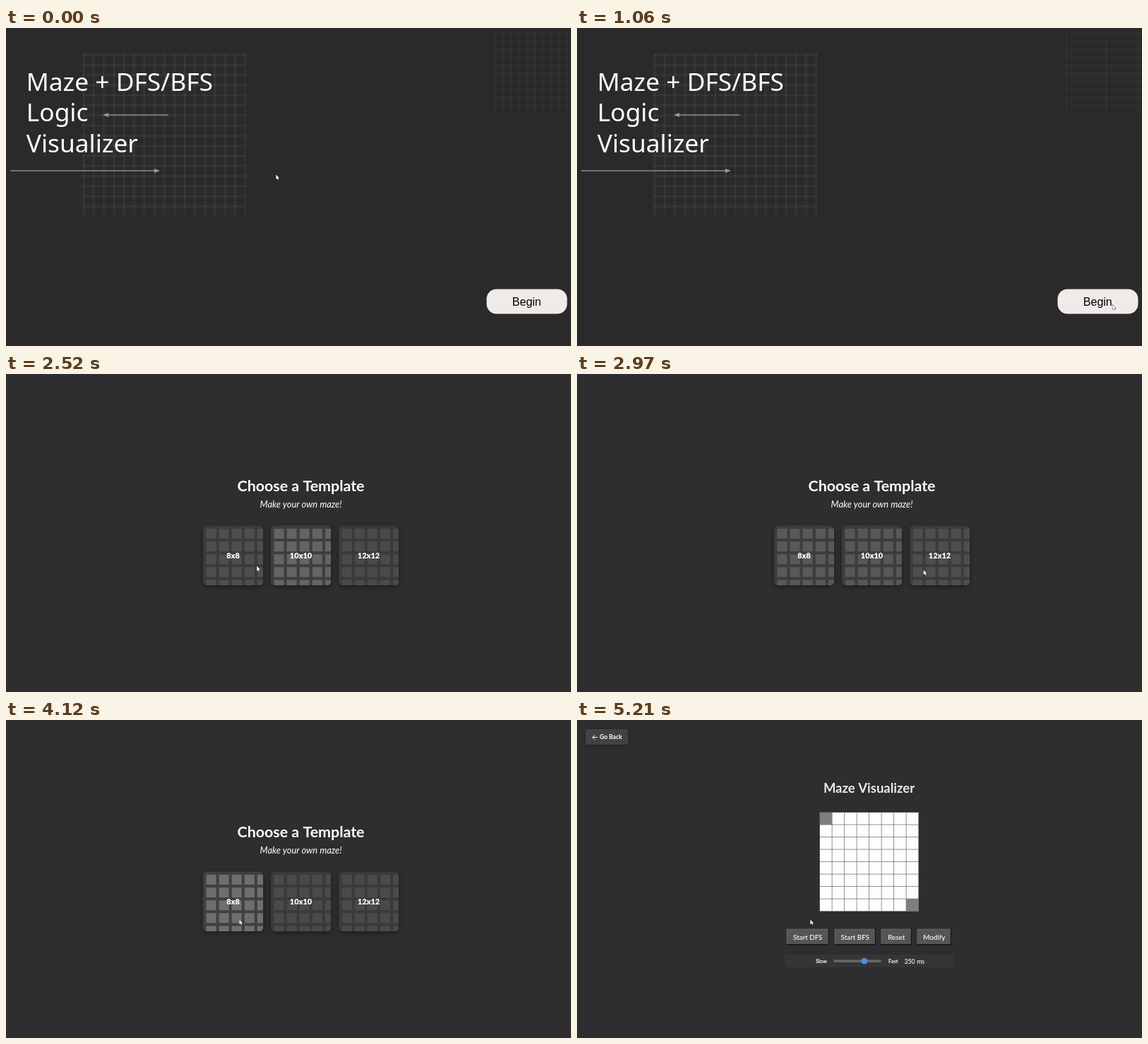
Write an HTML page with a canvas that moves like this. It is 800x450 px and loops after 5.24 s.

```html
<!DOCTYPE html>
<html lang="en">
<head>
<meta charset="utf-8">
<title>Maze visualizer</title>
<style>
  html, body { margin: 0; width: 100%; height: 100%; overflow: hidden; background: #2a2a2a; }
  canvas { display: block; width: 800px; height: 450px; }
</style>
</head>
<body>
<canvas width="800" height="450"></canvas>
<script>
const ctx = document.querySelector('canvas').getContext('2d');
const LOOP = 5240, CHOOSER_AT = 1090, RELEASE_AT = 4060, MAZE_AT = 4420;
const FADE = 300, HAND_DELAY = 40;
const CARD = { y: 214.5, w: 85, h: 84.5 };
const cardX = i => 279 + 96 * i;

// Places where the pointer pauses or turns
const STOPS = [
  { t: 30, x: 382, y: 207 },
  { t: 420, x: 758, y: 391 },
  { t: 1390, x: 758, y: 391 },
  { t: 1640, x: 567, y: 384 },
  { t: 1970, x: 522, y: 291 },
  { t: 2700, x: 325, y: 268 },
  { t: 3040, x: 510, y: 278 },
  { t: 3640, x: 330, y: 282 }
];

const smooth = p => p * p * (3 - 2 * p);
const clamp = (v, low, high) => Math.max(low, Math.min(high, v));

function pointerAt(t) {
  const next = clamp(STOPS.findIndex(s => s.t > t), 1, STOPS.length - 1);
  const i = t >= STOPS.at(-1).t ? STOPS.length - 1 : next;
  const a = STOPS[i - 1], b = STOPS[i];
  const p = smooth(clamp((t - a.t) / (b.t - a.t), 0, 1));
  return { x: a.x + (b.x - a.x) * p, y: a.y + (b.y - a.y) * p };
}

function hovers(i, t) {
  const { x, y } = pointerAt(t);
  return t > CHOOSER_AT && x > cardX(i) && x < cardX(i) + CARD.w && y > CARD.y && y < CARD.y + CARD.h;
}

// Share of the last FADE ms that the pointer spent on the card
function glow(i, t) {
  const samples = 50;
  let hits = 0;
  for (let n = 0; n < samples; n++) hits += hovers(i, t - n / samples * FADE);
  return hits / samples;
}

function rect(x, y, w, h, color) {
  ctx.fillStyle = color;
  ctx.fillRect(x, y, w, h);
}

function rounded(x, y, w, h, r, color) {
  ctx.fillStyle = color;
  ctx.beginPath();
  ctx.roundRect(x, y, w, h, r);
  ctx.fill();
}

function text(str, x, y, font, color = '#fff', align = 'center') {
  ctx.font = font;
  ctx.fillStyle = color;
  ctx.textAlign = align;
  ctx.fillText(str, x, y);
}

const lato = (size, style = 'bold') => `${style} ${size}px Lato, "Open Sans", sans-serif`;

function shadow(color, blur, dy) {
  ctx.shadowColor = color;
  ctx.shadowBlur = blur;
  ctx.shadowOffsetY = dy;
}

function grid(x, y, w, h, step, line, color) {
  for (let gx = x; gx < x + w; gx += step) rect(gx, y, Math.min(line, x + w - gx), h, color);
  for (let gy = y; gy < y + h; gy += step) rect(x, gy, w, Math.min(line, y + h - gy), color);
}

function arrow(from, to, y) {
  const back = to - Math.sign(to - from) * 8;
  rect(Math.min(from, back), y - .75, Math.abs(back - from), 1.5, '#8c8c8c');
  ctx.fillStyle = '#9a9a9a';
  ctx.beginPath();
  ctx.moveTo(to, y);
  ctx.lineTo(back, y - 3);
  ctx.lineTo(back, y + 3);
  ctx.fill();
}

function landing() {
  rect(0, 0, 800, 450, '#2a2a2a');
  grid(108, 36, 232, 228, 14.3, 4, 'rgba(255,255,255,.022)');
  grid(109, 37, 231, 227, 14.3, 2, 'rgba(255,255,255,.024)');
  grid(692.5, 7, 107.5, 113, 11.3, 1, '#363636');
  const font = '35.3px "Noto Sans", "Open Sans", sans-serif';
  ['Maze + DFS/BFS', 'Logic', 'Visualizer'].forEach((line, i) =>
    text(line, 28.8, 89 + i * 43.4, font, '#fff', 'left'));
  arrow(230, 137, 123);
  arrow(6, 218, 202);
  rounded(680.5, 369.5, 114, 35, 14, '#f0ebe8');
  text('Begin', 737.3, 392.5, '16px "Liberation Sans", Arial, sans-serif', '#000');
}

function card(label, i, t) {
  const x = cardX(i), level = glow(i, t);
  const gray = (low, high) => {
    const v = Math.round(low + (high - low) * level);
    return `rgb(${v},${v},${v})`;
  };
  shadow('rgba(0,0,0,.4)', 6, 2);
  rounded(x, CARD.y, CARD.w, CARD.h, 5, gray(58, 64));
  shadow('transparent', 0, 0);
  ctx.save();
  ctx.clip();
  for (let n = 0; n < 25; n++)
    rect(x + 4.5 + n % 5 * 18.1, 219 + Math.floor(n / 5) * 18.1, 14, 14, gray(74, 110));
  ctx.restore();
  text(label, x + CARD.w / 2, 261, lato(11, '900'));
}

function chooser(t) {
  rect(0, 0, 800, 450, '#2e2d2f');
  text('Choose a Template', 417.5, 166, lato(21.4), '#fffdf8');
  text('Make your own maze!', 417.5, 189, lato(12.8, 'italic'));
  ['8x8', '10x10', '12x12'].forEach((label, i) => card(label, i, t));
}

function button(label, x, w) {
  rect(x, 295.5, w, 23, '#161616');
  rect(x, 295.5, w - 1.5, 21.5, '#6a6a6a');
  rect(x + 1, 296.5, w - 2.5, 20.5, '#555');
  text(label, x + w / 2, 310.8, lato(9.8, '500'));
}

function board(x, y, size) {
  rect(x - .5, y - .5, 8 * size + .5, 8 * size + .5, '#777');
  for (let n = 0; n < 64; n++) {
    const isEnd = n === 0 || n === 63;
    rect(x + n % 8 * size, y + Math.floor(n / 8) * size, size - .8, size - .8, isEnd ? '#7f7f7f' : '#fdfdfd');
  }
}

function backButton() {
  shadow('rgba(0,0,0,.3)', 4, 1);
  rounded(12, 13, 60.5, 22, 4, '#434243');
  shadow('transparent', 0, 0);
  ctx.strokeStyle = '#fff';
  ctx.lineWidth = 1;
  ctx.stroke(new Path2D('M29 24.5H22M25 21.5L22 24.5L25 27.5'));
  text('Go Back', 32, 27.4, lato(8.6), '#fff', 'left');
}

function maze() {
  rect(0, 0, 800, 450, '#2e2d2f');
  backButton();
  text('Maze Visualizer', 413.5, 103, lato(18.5), '#ece9e9');
  board(344, 131, 17.5);

  button('Start DFS', 296.5, 60.5);
  button('Start BFS', 364.5, 58.5);
  button('Reset', 430.5, 43.5);
  button('Modify', 481.5, 48.5);

  rounded(294, 332, 239, 18, 4, '#363536');
  text('Slow', 346, 344, lato(7.4));
  rounded(363, 339.3, 68, 3.6, 1.8, '#676667');
  rounded(402.5, 336.8, 8.8, 8.8, 4.4, '#4a90e2');
  text('Fast', 447.7, 344, lato(7.4));
  text('350', 463.5, 344.5, lato(8.6, '500'), '#fff', 'left');
  text('ms', 492, 344.5, lato(8.6, '500'), '#fff', 'right');
}

const ARROW = new Path2D('M0 0V6.8L1.6 5.4L2.7 7.7L3.8 7.2L2.7 5H4.7Z');
const HAND = new Path2D('M1.4 .6Q2.3-.4 3.1 .6V3.6L6 4.2Q7.2 4.5 7 6L6.3 9.6H2.4L-.3 6.3Q-.4 5 1.4 5.9Z');

function pointer(t) {
  const { x, y } = pointerAt(t);
  const onCard = [0, 1, 2].some(i => hovers(i, t) && hovers(i, t - HAND_DELAY));
  const shape = onCard && t < RELEASE_AT ? HAND : ARROW;
  ctx.save();
  ctx.translate(x + .4, y + .4);
  ctx.lineWidth = 1;
  ctx.strokeStyle = 'rgba(20,20,20,.75)';
  ctx.fillStyle = '#fff';
  ctx.stroke(shape);
  ctx.fill(shape);
  ctx.restore();
}

function draw() {
  const t = (performance.now() - start) % LOOP;
  if (t < CHOOSER_AT) landing();
  else if (t < MAZE_AT) chooser(t);
  else maze();
  pointer(t);
  requestAnimationFrame(draw);
}

const start = performance.now();
draw();
</script>
</body>
</html>
```
